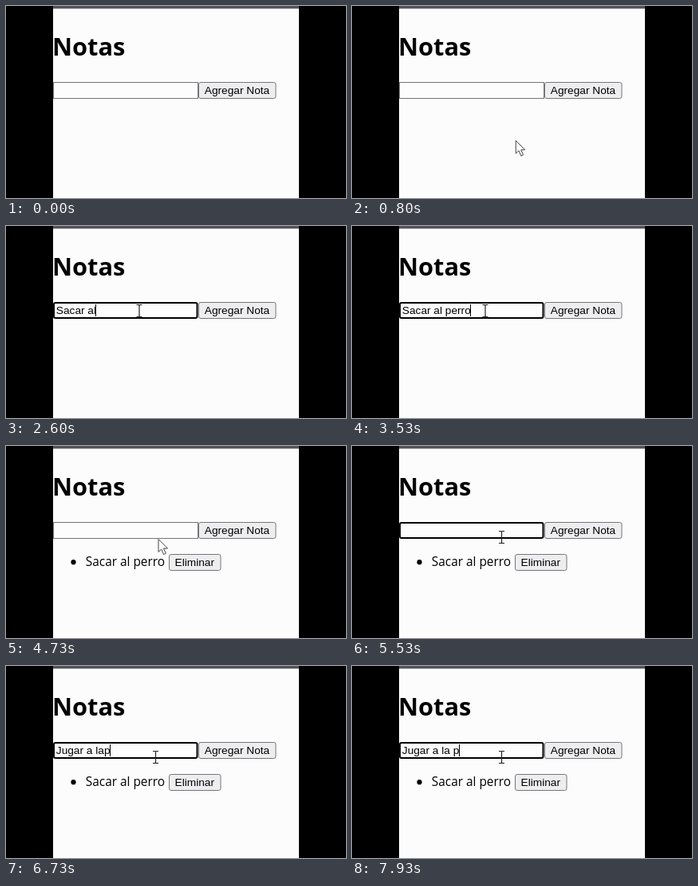
Animation of 426 by 240 pixels, one loop 8 s. Source, as an HTML page:

```html
<!DOCTYPE html>
<html lang="es">
<head>
<meta charset="utf-8">
<title>Notas</title>
<style>
  html, body { margin: 0; width: 100%; height: 100%; overflow: hidden; background: #000; }
  svg { display: block; width: 100%; height: 100%; }
  text { white-space: pre; fill: #000; }
  .title { font: bold 30.8px "Open Sans", "Noto Sans", sans-serif; }
  .item { font: 15.4px "Open Sans", "Noto Sans", sans-serif; }
  .ui { font: 13.7px "Liberation Sans", Arial, sans-serif; }
  .button { fill: #eeeef1; stroke: #767676; }
</style>
</head>
<body>
<svg viewBox="0 0 426 240">
  <rect width="426" height="240"/>
  <rect x="59" width="308" height="240" fill="#fcfcfd"/>
  <rect x="59" width="308" height="3.3" fill="#55535a"/>
  <text class="title" x="58" y="62">Notas</text>

  <rect id="field" fill="#fdfdfe"/>
  <text id="entry" class="ui" x="62.8" y="110"></text>
  <path id="caret" stroke="#000" d="M0 98V113"/>

  <rect id="add" class="button" x="241.5" y="95.5" width="96.5" height="20" rx="2.5"/>
  <text class="ui" x="248.8" y="110">Agregar Nota</text>

  <g id="note">
    <circle cx="84.5" cy="145.2" r="3.1"/>
    <text class="item" x="99.8" y="150">Sacar al perro</text>
    <rect class="button" x="204.5" y="135.5" width="64.5" height="20" rx="2.5"/>
    <text class="ui" x="211.6" y="150">Eliminar</text>
  </g>

  <path id="arrow" fill="#fff" stroke="#444" d="M.5 .5V16.5L4.2 13L7 19.5L9.8 18.3L7 12H12Z"/>
  <path id="beam" fill="none" stroke="#222" stroke-width="1.2"
        d="M-3.5 -7.5H-1Q0 -7.5 0 -6.5Q0 -7.5 1 -7.5H3.5M0 -6.5V6.5M-3.5 7.5H-1Q0 7.5 0 6.5Q0 7.5 1 7.5H3.5"/>
</svg>
<script>
const LOOP = 8000;
const $ = id => document.getElementById(id);
const [field, entry, caret, add, note, arrow, beam] =
  ['field', 'entry', 'caret', 'add', 'note', 'arrow', 'beam'].map($);

// Pointer stops: time, x, y
const path = [
  [500, 255, 250], [1050, 167, 106], [3600, 167, 106], [4050, 278, 108],
  [4350, 278, 108], [4680, 190.5, 116], [4800, 190.5, 116], [4900, 187.5, 114]
];
const clicks = { first: 1150, add: 4250, second: 5000 };

// Typed text as [time, value] steps
const steps = [[0, '']];
function type(text, start, gap) {
  for (let i = 1; i <= text.length; i++) steps.push([start + (i - 1) * gap, text.slice(0, i)]);
}
type('Sacar al perro', 1560, 138);
steps.push([clicks.add, '']);
type('Jugar a lap', 5640, 100);
steps.push([7200, 'Jugar a la'], [7480, 'Jugar a la '], [7760, 'Jugar a la p']);

const show = (el, on) => el.setAttribute('visibility', on ? 'visible' : 'hidden');
const set = (el, attrs) => { for (const k in attrs) el.setAttribute(k, attrs[k]); };

function pointerAt(t) {
  const i = path.findIndex(p => p[0] > t);
  if (i === 0) return path[0].slice(1);
  if (i < 0) return path[path.length - 1].slice(1);
  const [t0, x0, y0] = path[i - 1], [t1, x1, y1] = path[i];
  const u = (t - t0) / (t1 - t0), k = u * u * (3 - 2 * u);
  return [x0 + (x1 - x0) * k, y0 + (y1 - y0) * k];
}

function render(t) {
  const focusStart = t >= clicks.second ? clicks.second : clicks.first;
  const focused = t >= clicks.first && (t < 4200 || t >= clicks.second);
  set(field, focused
    ? { x: 60, y: 96, width: 179.5, height: 19, rx: 2, stroke: '#000', 'stroke-width': 2 }
    : { x: 59.5, y: 95.5, width: 181, height: 20, rx: 0, stroke: '#767676', 'stroke-width': 1 });

  const [changed, value] = steps.filter(s => s[0] <= t).pop();
  entry.textContent = value;
  const caretX = 63 + (value ? entry.getComputedTextLength() : 0);
  caret.setAttribute('transform', `translate(${Math.round(caretX) - 0.5} 0)`);
  show(caret, focused && (t - Math.max(changed, focusStart)) % 1000 < 500);

  show(note, t >= clicks.add);

  const [x, y] = pointerAt(t);
  const inField = x > 59 && x < 240 && y > 95 && y < 116;
  const onButton = x > 241 && x < 338 && y > 95 && y < 116;
  add.style.fill = onButton ? '#e5e5e8' : '';
  show(beam, inField);
  show(arrow, !inField);
  for (const el of [beam, arrow]) el.setAttribute('transform', `translate(${x} ${y})`);
}

const start = performance.now();
function tick() {
  render((performance.now() - start) % LOOP);
  requestAnimationFrame(tick);
}
tick();
</script>
</body>
</html>
```
